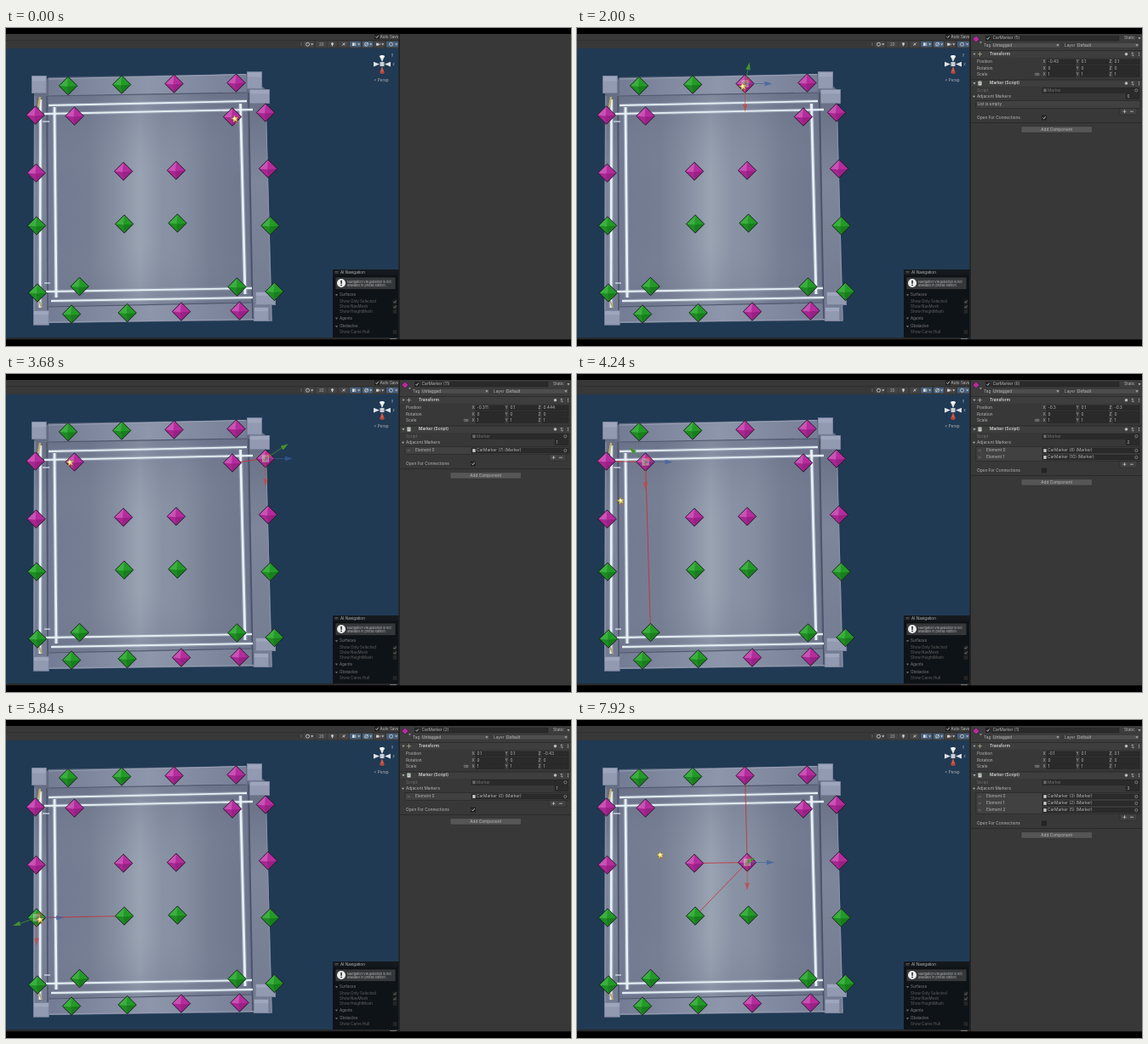
An HTML page for the animation above (8000 ms loop, 664x374 px).

```html
<!DOCTYPE html>
<html lang="en">
<head>
<meta charset="utf-8">
<title>Marker inspector</title>
<style>
html, body { margin: 0; width: 100%; height: 100%; overflow: hidden; background: #000; }
svg { display: block; width: 100vw; height: 100vh; }
text { font-family: Inter, Roboto, sans-serif; font-size: 4.8px; fill: #b8b8b8; white-space: pre; }
</style>
</head>
<body>
<svg id="stage" viewBox="0 0 664 374">
  <defs>
    <linearGradient id="floor">
      <stop offset="0" stop-color="#717890"/><stop offset=".2" stop-color="#757d92"/>
      <stop offset=".32" stop-color="#848da0"/><stop offset=".45" stop-color="#9aa4b3"/>
      <stop offset=".56" stop-color="#8a93a5"/><stop offset=".66" stop-color="#868fa2"/>
      <stop offset=".8" stop-color="#757d92"/><stop offset="1" stop-color="#6d748b"/>
    </linearGradient>
    <linearGradient id="shade" x2="0" y2="1">
      <stop offset="0" stop-color="#5f6880" stop-opacity=".45"/><stop offset=".4" stop-color="#8a93a4" stop-opacity=".05"/>
      <stop offset=".7" stop-color="#8a93a4" stop-opacity=".05"/><stop offset="1" stop-color="#666f86" stop-opacity=".4"/>
    </linearGradient>
    <linearGradient id="wall">
      <stop offset="0" stop-color="#737c94"/><stop offset=".5" stop-color="#8d96aa"/><stop offset="1" stop-color="#757e96"/>
    </linearGradient>
    <linearGradient id="side" x2="0" y2="1">
      <stop offset="0" stop-color="#666e83"/><stop offset=".4" stop-color="#7e869b"/><stop offset="1" stop-color="#737b91"/>
    </linearGradient>
    <clipPath id="view"><rect y="24" width="462" height="340"/></clipPath>
  </defs>
  <g clip-path="url(#view)">
    <g id="scene"></g>
    <g transform="translate(.5 .5)">
      <g id="links"></g>
      <g id="markers"></g>
      <g id="gizmo"></g>
    </g>
  </g>
  <g id="chrome"></g>
  <g id="panel"></g>
  <g id="cursor"></g>
</svg>
<script>
const LOOP = 8000, STEP = 80;
const $ = id => document.getElementById(id);

const rect = (x, y, w, h, fill, extra = '') =>
  `<rect x="${x}" y="${y}" width="${w}" height="${h}" fill="${fill}" ${extra}/>`;
const poly = (pts, fill, extra = '') => `<polygon points="${pts}" fill="${fill}" ${extra}/>`;
const line = (x1, y1, x2, y2, color, w = 1, extra = '') =>
  `<line x1="${x1}" y1="${y1}" x2="${x2}" y2="${y2}" stroke="${color}" stroke-width="${w}" ${extra}/>`;
const text = (x, y, s, extra = '') => `<text x="${x}" y="${y + 1.4}" ${extra}>${s}</text>`;
const path = (d, color, w = .8) => `<path d="${d}" fill="none" stroke="${color}" stroke-width="${w}"/>`;
const fold = (x, y, c = '#aaa') => poly(`${x - 1.6},${y - 1} ${x + 1.6},${y - 1} ${x},${y + 1.4}`, c);
const tick = (x, y, c = '#ddd') => path(`M${x - 1.5} ${y}l1.2 1.3 2-2.8`, c);
const box = (x, y, on, c = '#ddd') =>
  rect(x - 2.5, y - 2.5, 5, 5, '#262626', 'stroke="#151515" stroke-width=".5"') + (on ? tick(x, y, c) : '');

const PURPLE = ['#b52c9d', '#d162be', '#8d1c7a'];
const GREEN = ['#239a27', '#46b84a', '#14721a'];
const PURPLE_COUNT = 12;
const markers = [
  [197, 65], [270, 64], [34, 102], [80, 103], [265.5, 104], [304.5, 99],
  [35, 170], [137.5, 168], [199.5, 167], [307.5, 165], [205.5, 333], [274, 332],
  [72.5, 67.5], [135.5, 66], [35.5, 232], [138.5, 230], [201, 229], [310, 232],
  [36.5, 311], [86, 303.5], [271, 304], [315, 309.5], [76.5, 336], [142, 334.5]
];

// at: click time, m: marker, to: linked markers, refs: listed numbers
const picks = [
  { at: 80, m: 4, id: 7, pos: [-0.299, 0.1, 0.318], to: [3, 19, 1], refs: [9, 6, 8] },
  { at: 1760, m: 0, id: 5, pos: [-0.43, 0.1, 0.1], to: [], refs: [], open: true },
  { at: 2720, m: 5, id: 11, pos: [-0.311, 0.1, 0.444], to: [4], refs: [7], open: true },
  { at: 3760, m: 3, id: 6, pos: [-0.3, 0.1, -0.3], to: [19, 2], refs: [8, 10] },
  { at: 4480, m: 6, id: 3, pos: [-0.1, 0.1, -0.43], to: [], refs: [], open: true },
  { at: 5440, m: 14, id: 2, pos: [0.1, 0.1, -0.43], to: [15], refs: [0], open: true },
  { at: 6400, m: 10, id: 4, pos: [0.43, 0.1, 0.106], to: [16], refs: [2], open: true },
  { at: 7200, m: 8, id: 1, pos: [-0.1, 0.1, 0.1], to: [7, 15, 0], refs: [3, 2, 5] }
];

const track = [
  [0, 269, 107], [640, 269, 107], [1120, 248, 124], [1680, 195, 69], [2080, 195, 69],
  [2640, 304, 100], [2960, 304, 101], [3600, 75, 104], [3920, 77, 105], [4440, 39, 171],
  [4960, 39, 171], [5400, 37, 233], [5840, 40, 235], [6360, 206, 338], [6960, 206, 338],
  [7180, 200, 169], [7440, 199, 170], [7920, 98, 159], [8000, 96, 158]
];

function cursorAt(t) {
  let i = 0;
  while (i < track.length - 2 && t >= track[i + 1][0]) i++;
  const [a, x, y] = track[i], [b, u, v] = track[i + 1];
  const p = (t - a) / (b - a), e = p * p * (3 - 2 * p);
  return [x + (u - x) * e, y + (v - y) * e];
}

function diamond([x, y], [base, light, dark]) {
  const r = 10.7, outline = `0,${-r} ${r},0 0,${r} ${-r},0`;
  return `<g transform="translate(${x} ${y})">`
    + poly(outline, base)
    + poly(`0,${-r} ${-r},0 -1,1`, light, 'opacity=".7"')
    + poly(`${-r},0 0,${r} -1,1`, dark, 'opacity=".3"')
    + poly(`${r},0 0,${r} -1,1`, dark, 'opacity=".7"')
    + poly(outline, 'none', 'stroke="#1c1620" stroke-width=".9"') + '</g>';
}

function block(x, y, w, h) {
  return rect(x, y, w, h, '#929ab2') + rect(x, y, w, h * .3, '#a4acc2', 'opacity=".7"')
    + rect(x + .3, y + .3, w - .6, h - .6, 'none', 'stroke="#6c758d" stroke-width=".6"');
}

function drawScene() {
  let s = rect(0, 24, 462, 340, '#203a54');
  s += poly('33,76 50,58 284,54 305,72 313,345 291,344 50,347 32,340', '#626b81');
  s += poly('50,60 282,54 283,76 50,80', 'url(#wall)');
  s += poly('33,78 48,78 50,335 32,340', 'url(#side)');
  s += poly('285,72 305,72 312,345 290,344', 'url(#side)');
  s += poly('50,326 290,322 291,343 50,347', 'url(#wall)');
  s += poly('50,80 283,76 288,323 50,328', 'url(#floor)') + poly('50,80 283,76 288,323 50,328', 'url(#shade)');
  s += line(50, 80, 283, 76, '#4f586d', 1.2) + line(50, 328, 289, 323, '#4f586d', 1.2);
  s += line(50, 60, 282, 54.5, '#99a2b6') + line(50, 346, 291, 342.5, '#949db2');
  s += line(285, 76, 290, 342, '#485166', 1.6) + line(305, 75, 312, 344, '#8b94a9');
  s += line(34, 80, 33, 338, '#8c95aa') + line(48, 80, 49, 334, '#4c556a', 1.6);
  const strips = [
    [50, 91, 283, 86, 1.8], [45, 101, 290, 96, 1.8], [40.5, 84, 40, 329, 2.6], [57, 93, 59, 317, 2.8],
    [275.5, 89, 281, 313, 2.8], [47, 310, 289, 306, 1.8], [53, 321, 290, 317, 1.8]
  ];
  for (const [a, b, c, d, w] of strips) s += line(a, b, c, d, '#d5e4f2', w + 2.4, 'opacity=".25"');
  for (const [a, b, c, d, w] of strips) s += line(a, b, c, d, '#e6f0f5', w);
  s += line(43, 110, 51, 110, '#dce8f0', 1.2) + line(45, 300, 52, 300, '#dce8f0', 1.2);
  s += line(40, 81, 38, 93, '#c9b16a', 2.2) + line(39, 321, 42, 329, '#b9a573', 2);
  s += block(30, 56, 17.5, 21) + block(283, 51.5, 18, 20) + block(286, 72, 24, 17);
  s += block(32, 332, 18.5, 17.5) + block(293, 310, 24, 16) + block(291, 328, 18, 17);
  $('scene').innerHTML = s;
  $('markers').innerHTML = markers.map((p, i) => diamond(p, i < PURPLE_COUNT ? PURPLE : GREEN)).join('');
}

function viewGizmo() {
  return poly('439,33 445,33 442,40', '#e4e4e4') + `<ellipse cx="442" cy="33.4" rx="3" ry="1.4" fill="#fff"/>`
    + poly('432,39.8 432,45.4 439,42.6', '#dfe3e8') + poly('452,39.8 452,45.4 445,42.6', '#dfe3e8')
    + rect(439.5, 40, 5, 5, '#c9ced6') + poly('439.3,52.5 444.7,52.5 442,45', '#cf5a48')
    + `<ellipse cx="442" cy="52.5" rx="2.7" ry="1.4" fill="#b8463a"/>`
    + text(453, 32, 'y', 'style="font-size:4px"') + text(454.5, 43, 'z', 'style="font-size:4px"')
    + text(432.3, 61.6, '&lt; Persp', 'style="font-size:4.7px"');
}

function navPanel() {
  const small = 'style="font-size:4.5px;fill:#858585"', dim = 'style="font-size:4.5px;fill:#656565"';
  let s = rect(384, 284, 77.5, 80, '#0e1317') + rect(384, 284, 77.5, 6.5, '#15191d');
  s += line(386.5, 286.5, 390.5, 286.5, '#777', .6) + line(386.5, 288, 390.5, 288, '#777', .6);
  s += text(393, 287.3, 'AI Navigation', 'style="font-size:4.6px"');
  s += rect(387, 293, 71, 14.5, '#35383b', 'stroke="#0c0c0c" stroke-width=".7"');
  s += `<circle cx="394" cy="300" r="5" fill="#eee"/>` + rect(393.3, 296.8, 1.5, 4, '#222') + rect(393.3, 301.7, 1.5, 1.5, '#222');
  s += text(401, 298.3, 'Navigation visualization is not', 'style="font-size:3.7px"');
  s += text(401, 302.7, 'available in prefab edition.', 'style="font-size:3.7px"');
  for (const [y, name] of [[314, 'Surfaces'], [341.5, 'Agents'], [351, 'Obstacles']])
    s += fold(388.5, y, '#666') + text(392, y, name, small);
  for (const [y, name, on] of [[322, 'Show Only Selected', 1], [328, 'Show NavMesh', 1], [333.5, 'Show HeightMesh', 0], [357.5, 'Show Carve Hull', 0]])
    s += text(392, y, name, dim) + box(457, y, on, '#777');
  return s;
}

function toolbar() {
  let s = rect(0, 7, 462, 17, '#383838') + rect(0, 14, 462, .6, '#2a2a2a');
  s += box(436, 10.3, true) + text(439.5, 10.3, 'Auto Save', 'style="font-size:4.6px"');
  s += line(347, 17, 347, 21, '#888', .6);
  const items = [[350, 12], [364, 13], [378, 11], [391, 12], [404, 13], [419, 12], [432, 13], [447, 14]];
  items.forEach(([x, w], i) => {
    const on = i === 4 || i === 5 || i === 7;
    s += rect(x, 15.8, w, 6.8, on ? '#46607c' : '#444', 'rx=".8"');
    const cx = x + w / 2 - (i === 0 || i > 3 ? 1.5 : 0);
    if (i === 1) s += text(cx - 2.6, 19.2, '2D', 'style="font-size:4.2px"');
    else if (i === 2) s += `<circle cx="${cx}" cy="18.6" r="1.5" fill="#ccc"/>` + rect(cx - .6, 20, 1.2, 1.2, '#ccc');
    else if (i === 3) s += path(`M${cx - 2} 20.5l4-3m-3 0l2 3`, '#ccc');
    else if (i === 6) s += rect(cx - 2, 17.7, 3, 3, '#ccc') + poly(`${cx + 1},19.2 ${cx + 2.5},17.8 ${cx + 2.5},20.6`, '#ccc');
    else if (i === 4) s += rect(cx - 2, 17.4, 2.6, 3.5, '#ddd') + line(cx + 1.7, 17.4, cx + 1.7, 21, '#ddd', .7);
    else s += `<circle cx="${cx}" cy="19.2" r="2" fill="none" stroke="#d2d2d2" stroke-width=".8"/>`
      + (i === 5 ? line(cx - 2, 21, cx + 2, 17.4, '#ddd', .7) : '');
    if (i === 0 || i > 3) s += fold(x + w - 2.3, 19.2, '#bbb');
  });
  return s;
}

function drawChrome() {
  $('chrome').innerHTML = toolbar() + viewGizmo() + navPanel()
    + rect(0, 364, 462, 2.5, '#292929') + rect(451, 365, 8, 1, '#777')
    + rect(462, 7, 202, 359.5, '#383838') + rect(461.5, 7, 1.2, 359.5, '#1c1c1c')
    + rect(0, 0, 664, 7, '#000') + rect(0, 366.5, 664, 7.5, '#000');
}

function arrow(x, y, dx, dy, color, opacity = 1) {
  const n = Math.hypot(dx, dy) || 1, ux = dx / n, uy = dy / n;
  const bx = x + dx - ux * 4, by = y + dy - uy * 4, tx = x + dx + ux * 5, ty = y + dy + uy * 5;
  return `<g opacity="${opacity}">` + line(x, y, bx, by, color, .8)
    + poly(`${tx},${ty} ${bx - uy * 2.8},${by + ux * 2.8} ${bx + uy * 2.8},${by - ux * 2.8}`, color) + '</g>';
}

function moveGizmo([x, y]) {
  const gx = (x - 172) * .17, gy = (y - 185) * .17;
  return rect(x - 4, y - 4, 8, 8, '#e8d8e4', 'opacity=".35"')
    + rect(x, y - 6, 6, 6, '#d04a3a', 'opacity=".4"') + rect(x - 4, y - 2, 6, 6, '#62b04a', 'opacity=".35"')
    + arrow(x, y, 0, 28, '#c8443e', .75) + arrow(x, y, 27, 0, '#3a5f9e', .7) + arrow(x, y, gx, gy, '#45902f')
    + rect(x - 3.5, y - 3.5, 7, 7, 'none', 'stroke="#d8cfd8" stroke-width=".6" opacity=".6"');
}

function header(y, name) {
  return rect(463, y - 4, 201, 8, '#3e3e3e') + rect(463, y - 4.3, 201, .6, '#202020')
    + fold(467, y) + text(485, y, name, 'style="font-weight:600;fill:#d2d2d2"')
    + `<circle cx="645.5" cy="${y}" r="1.8" fill="#bbb"/>` + path(`M651.5 ${y - 1.2}h3m-3 2.4h3m-2 -3.2v2m1.2 .6v2`, '#bbb', .6)
    + [-1.6, 0, 1.6].map(d => rect(660, y + d - .4, .9, .9, '#ccc')).join('');
}

const field = (x, y, w, value = '') =>
  rect(x, y - 3, w, 6, '#2a2a2a', 'stroke="#1f1f1f" stroke-width=".4"') + text(x + 1.5, y, value);

const dropdown = (x, y, w, value) =>
  rect(x, y - 3, w, 6, '#4d4d4d', 'rx=".8" stroke="#2c2c2c" stroke-width=".5"') + text(x + 2, y, value) + fold(x + w - 3, y);

const objectField = (y, name, style = '') =>
  field(547, y, 114) + rect(548.3, y - 1.9, 3.4, 3.8, '#c8c8c8', style && 'opacity=".4"') + text(553, y, name, style)
  + `<circle cx="657.3" cy="${y}" r="1.6" fill="none" stroke="#aaa" stroke-width=".6"/>`;

function vectorRow(y, name, values) {
  return text(470, y, name) + values.map((v, i) =>
    text(547.5 + i * 39, y, 'XYZ'[i]) + field(552 + i * 39, y, i < 2 ? 34 : 31, v)).join('');
}

function inspector({ id, pos, refs, open }) {
  const dim = 'style="fill:#707070"';
  const rows = Math.max(1, refs.length), end = 86 + rows * 8;
  let s = rect(463, 7.5, 201, 19, '#3c3c3c');
  s += poly('469,9 473,13 469,17 465,13', PURPLE[0], 'stroke="#201020" stroke-width=".5"') + fold(474.5, 17, '#888');
  s += box(483, 12, true) + field(487, 12, 150, `CarMarker (${id})`) + text(643, 12, 'Static') + fold(661, 12);
  s += text(478, 20.3, 'Tag') + dropdown(487, 20.3, 81, 'Untagged') + text(573, 20.3, 'Layer') + dropdown(586, 20.3, 75, 'Default');
  s += header(30.7, 'Transform') + path('M473.5 28.2v5m-2.5-2.5h5', '#b9b9a0', .7);
  s += vectorRow(40, 'Position', pos) + vectorRow(47.2, 'Rotation', [0, 0, 0]) + vectorRow(54.4, 'Scale', [1, 1, 1]);
  s += [539.5, 542].map(x => `<circle cx="${x}" cy="54.4" r="1.2" fill="none" stroke="#aaa" stroke-width=".6"/>`).join('');
  s += header(65, 'Marker (Script)') + rect(471.5, 62.5, 4, 5, '#d8d8d8') + text(472.2, 65, '#', 'style="font-size:4px;fill:#3c7a3c"');
  s += text(470, 73.3, 'Script', dim) + objectField(73.3, 'Marker', dim);
  s += fold(466.5, 80.7) + text(470, 80.7, 'Adjacent Markers') + field(645, 80.7, 16, refs.length);
  s += rect(469, 85.5, 193, rows * 8 + .7, '#414141', 'stroke="#242424" stroke-width=".6"');
  if (!refs.length) s += text(470.5, 89.8, 'List is empty');
  refs.forEach((n, i) => {
    const y = 90 + i * 8;
    s += line(471.5, y - .6, 475, y - .6, '#777', .5) + line(471.5, y + .7, 475, y + .7, '#777', .5);
    s += text(481, y, `Element ${i}`) + objectField(y, `CarMarker (${n}) (Marker)`);
  });
  s += rect(638, end + .5, 20, 7.5, '#414141', 'stroke="#242424" stroke-width=".5"');
  s += path(`M641.5 ${end + 4.2}h4m-2-2v4M650 ${end + 4.2}h4`, '#d0d0d0', .7);
  s += text(470, end + 11.5, 'Open For Connections') + box(549, end + 11.5, open);
  s += rect(463, end + 17, 201, .6, '#222');
  s += rect(522, end + 21.7, 83.5, 7.4, '#565656', 'rx="1" stroke="#2c2c2c" stroke-width=".5"');
  s += text(563.7, end + 25.4, 'Add Component', 'text-anchor="middle"');
  return s;
}

function star() {
  const pts = Array.from({ length: 10 }, (_, i) => {
    const a = i * Math.PI / 5 - 1.75, r = i % 2 ? 2 : 4.8;
    return `${(Math.cos(a) * r).toFixed(2)},${(Math.sin(a) * r).toFixed(2)}`;
  }).join(' ');
  return poly(pts, '#f3dc6a', 'stroke="#8a6a28" stroke-width=".5"') + `<circle cx="-.6" cy="-.8" r="1.3" fill="#fffbe0"/>`
    + line(1, 3, 2.4, 6, '#d2644a', 1);
}

let shown;
function select(pick) {
  if (pick === shown) return;
  shown = pick;
  const from = pick && markers[pick.m];
  $('panel').innerHTML = pick ? inspector(pick) : '';
  $('links').innerHTML = pick ? pick.to.map(i => line(...from, ...markers[i], '#cc2a30', .8)).join('') : '';
  $('gizmo').innerHTML = pick ? moveGizmo(from) : '';
}

function render(now) {
  const t = Math.floor(now % LOOP / STEP) * STEP;
  select(picks.filter(p => p.at <= t).pop());
  const [x, y] = cursorAt(t);
  $('cursor').setAttribute('transform', `translate(${x.toFixed(2)} ${y.toFixed(2)})`);
}

drawScene();
drawChrome();
$('cursor').innerHTML = star();
render(0);
const start = performance.now();
(function loop() {
  render(performance.now() - start);
  requestAnimationFrame(loop);
})();
</script>
</body>
</html>
```
